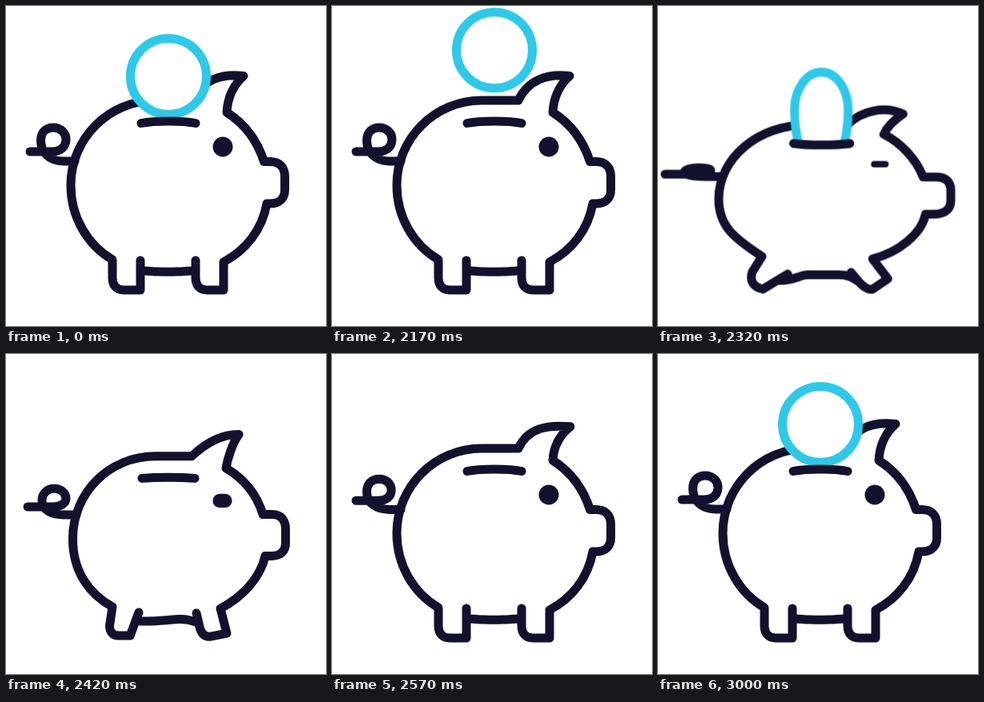
Animation, 400 px wide and 400 px high, one loop 3020 ms. Source, as an HTML page:

```html
<!DOCTYPE html>
<html lang="en">
<head>
<meta charset="utf-8">
<title>Piggy bank</title>
<style>
html, body { margin: 0; width: 100%; height: 100%; overflow: hidden; background: #fff; }
svg { display: block; width: 100vw; height: 100vh; }

:root {
  --body-rest: path("M233 118 L187 118 C128.5 118 81 165.500 81 224 C81 264 102 299 133 317 L133 340 C133 349 138 355 147 355 L168 355 L168 318 M237 318 L237 340 C237 349 242 355 251 355 L272 355 L272 320 C300 305 320 280 326 247 L330 247 C342 247 348.5 240 348.5 230 L348.5 213 C348.5 201 341 194.5 330 194.5 L322.5 194.5 C314 168 298 147 276 133 C277 115 284 99 297 87.5 C270 84 245 92 233 118 L233 118");
  --body-squash: path("M236 148 L187 148 C125 148 76 190 76 241 C76 275 95 290 130 313 L118 332 C114 343 119 351 131 354 L131 354 L162 335 M241 333 L252 346 C258 352 263 355 268 354 L287 341 L268 316 C300 308 329 285 334 260 L345 260 C359 260 365.5 253 365.5 243 L365.5 230 C365.5 219 359 213.5 347 213.5 L331 213.5 C322 190 302 170 282 160 C286 150 295 142 306 134.5 C283 124 255 130 236 148 L236 148");
  --body-lift: path("M232 128 L187 128 C128 128 83.5 174 83.5 231 C83.5 272 104 300 133 316 L130 336 C128 345 132 352 141 352 L155 352 L166 323 M238 324 L242 341 C244 350 249 354 256 353 L276 349 L268 318 C295 304 318 280 324 252.5 L333 252.5 C344 252 349.5 246 349.5 236 L349.5 219 C349.5 207 343 200.5 333 200.5 L321 200.5 C314 178 299 157 275 143 C277 130 283 112 291 100.500 C272 100.500 252 109 232 128 L232 128");
  --body-settle: path("M233 118 L187 118 C128.5 118 81 165.500 81 224 C81 264 102 299 133 317 L133 340 C133 349 138 355 147 355 L168 355 L168 318 M237 318 L237 340 C237 349 242 355 251 355 L272 355 L272 320 C300 305 320 280 326 247 L330 247 C342 247 348.5 240 348.5 230 L348.5 213 C348.5 201 341 194.5 330 194.5 L322.5 194.5 C314 168 298 147 276 133 C277 115 286 101 298 91.5 C270 89 245 92 233 118 L233 118");

  --belly-rest: path("M171 331 C177 331 183 332 190 332 C200 332.5 205 332.5 214 332 C221 332 228 331 234 331");
  --belly-squash: path("M152 343 C170 343 178 336 187 336 C200 336 210 336 222 336 C235 335 243 339 248 343");
  --belly-lift: path("M168 334 C178 334 184 334 190 333.5 C200 333 208 332 216 331.5 C226 331 232 333 237 335");

  --tail-rest: path("M86 194 L72 194 C54 194 43.5 183 43.5 168 C43.5 158 50 152 59 152 C68 152 75 158 75 167 C75 176 68 182 58 182 L30 182");
  --tail-squash: path("M78 213 L60 213 C45 213 33 211 33 208 C33 204 42 202 50 202 C60 202 66 203 66 205 C66 208 58 210 48 210 L9 210");
  --tail-lift: path("M88 201 L72 201 C58 201 45 196 45 183 C45 174 52 168.5 60 168.5 C69 168.5 75 174 75 181 C75 187 68 191 58 191 L27 191");
  --tail-settle: path("M86 194.5 L72 194.5 C54 194.5 43.5 186 43.5 173 C43.5 163 50 157 59 157 C68 157 74 163 74 171 C74 179 68 183.5 57 183.5 L30 183.5");

  --slot-rest: path("M169 146.5 C185 143 221 143 237 146.5");
  --slot-squash: path("M169.5 171.5 C187 174 222 174 239.5 171.5");
  --slot-lift: path("M170 155.5 C187 154 219 154 236 155.5");

  --coin-round: path("M203 -47.5 C229.2 -47.5 250.5 -26.2 250.5 0 C250.5 26.2 229.2 47.5 203 47.5 C176.8 47.5 155.5 26.2 155.5 0 C155.5 -26.2 176.8 -47.5 203 -47.5 Z");
  --coin-egg: path("M204 -47.5 C222.5 -47.5 237.5 -26.2 237.5 0 C237.5 44 222.5 80 204 80 C185.5 80 170.5 44 170.5 0 C170.5 -26.2 185.5 -47.5 204 -47.5 Z");

  --hit: cubic-bezier(.5, 0, .9, .7);
}

.line { fill: none; stroke: #12122f; stroke-width: 11; stroke-linecap: round; stroke-linejoin: round; }
.eye { fill: #12122f; }
.coin { fill: #fff; stroke: #30c8e8; stroke-width: 11; }

.bank, .body, .belly, .tail, .slot, .mask, .eye, .coin { animation: 3020ms linear infinite; }
.bank { animation-name: bank; }
.body { animation-name: body; }
.belly { animation-name: belly; }
.tail { animation-name: tail; }
.slot { animation-name: slot; }
.mask { animation-name: mask; }
.eye { animation-name: eye; }
.coin { animation-name: drop, stretch; }

/* deepest moment of the squash */
@keyframes bank {
  0%, 76.821% { transform: translate(0px, 0px) scale(1, 1); animation-timing-function: ease-out; }
  77.649% { transform: translate(-4.1px, 10.9px) scale(1.03, .97); }
  80.132%, 100% { transform: translate(0px, 0px) scale(1, 1); }
}
@keyframes body {
  0%, 72.848% { d: var(--body-rest); animation-timing-function: var(--hit); }
  76.821%, 77.649% { d: var(--body-squash); }
  80.132% { d: var(--body-lift); animation-timing-function: ease-out; }
  84.6% { d: var(--body-settle); }
  87.748%, 100% { d: var(--body-rest); }
}
@keyframes belly {
  0%, 72.848% { d: var(--belly-rest); animation-timing-function: var(--hit); }
  76.821%, 77.649% { d: var(--belly-squash); }
  80.132% { d: var(--belly-lift); animation-timing-function: ease-out; }
  84.6%, 100% { d: var(--belly-rest); }
}
@keyframes tail {
  0%, 72.848% { d: var(--tail-rest); animation-timing-function: var(--hit); }
  76.821%, 77.649% { d: var(--tail-squash); }
  80.132% { d: var(--tail-lift); animation-timing-function: ease-out; }
  84.6% { d: var(--tail-settle); }
  87.748%, 100% { d: var(--tail-rest); }
}
@keyframes slot {
  0%, 72.848% { d: var(--slot-rest); animation-timing-function: var(--hit); }
  76.821%, 77.649% { d: var(--slot-squash); }
  80.132% { d: var(--slot-lift); animation-timing-function: ease-out; }
  84.6%, 100% { d: var(--slot-rest); }
}
@keyframes mask {
  0%, 72.848% { transform: translateY(145px); animation-timing-function: var(--hit); }
  76.821%, 77.649% { transform: translateY(172px); }
  80.132% { transform: translateY(155px); animation-timing-function: ease-out; }
  84.6%, 100% { transform: translateY(145px); }
}
@keyframes eye {
  0%, 72.848% { x: 258.5px; y: 163.5px; width: 25px; height: 25px; rx: 12.5px; ry: 12.5px; animation-timing-function: var(--hit); }
  76.821%, 77.649% { x: 266px; y: 193.5px; width: 22px; height: 8px; rx: 4px; ry: 4px; }
  80.132% { x: 258.5px; y: 175px; width: 24px; height: 17px; rx: 8.5px; ry: 8.5px; animation-timing-function: ease-out; }
  84.6%, 100% { x: 258.5px; y: 163.5px; width: 25px; height: 25px; rx: 12.5px; ry: 12.5px; }
}
/* hop, drop into the slot, pop out again */
@keyframes drop {
  0%, 66.886% { transform: translateY(88px); }
  66.887% { transform: translateY(79.5px); animation-timing-function: cubic-bezier(.2, .5, .5, 1); }
  72.517% { transform: translateY(55px); animation-timing-function: var(--hit); }
  76.821% { transform: translateY(128px); }
  79.139% { transform: translateY(225px); }
  79.2%, 85.762% { transform: translateY(205px); animation-timing-function: cubic-bezier(.3, .4, .5, 1); }
  91.391% { transform: translateY(67px); animation-timing-function: ease-in-out; }
  98.013%, 100% { transform: translateY(88px); }
}
@keyframes stretch {
  0%, 72.848% { d: var(--coin-round); animation-timing-function: var(--hit); }
  76.821%, 85.762% { d: var(--coin-egg); }
  90.4%, 100% { d: var(--coin-round); }
}
</style>
</head>
<body>
<svg viewBox="0 0 400 400">
  <clipPath id="above"><rect class="mask" y="-400" width="400" height="400"/></clipPath>
  <g class="bank">
    <path class="line tail"/>
    <path class="line belly"/>
    <path class="line body"/>
    <rect class="eye"/>
    <g clip-path="url(#above)"><path class="coin"/></g>
    <path class="line slot"/>
  </g>
</svg>
</body>
</html>
```
